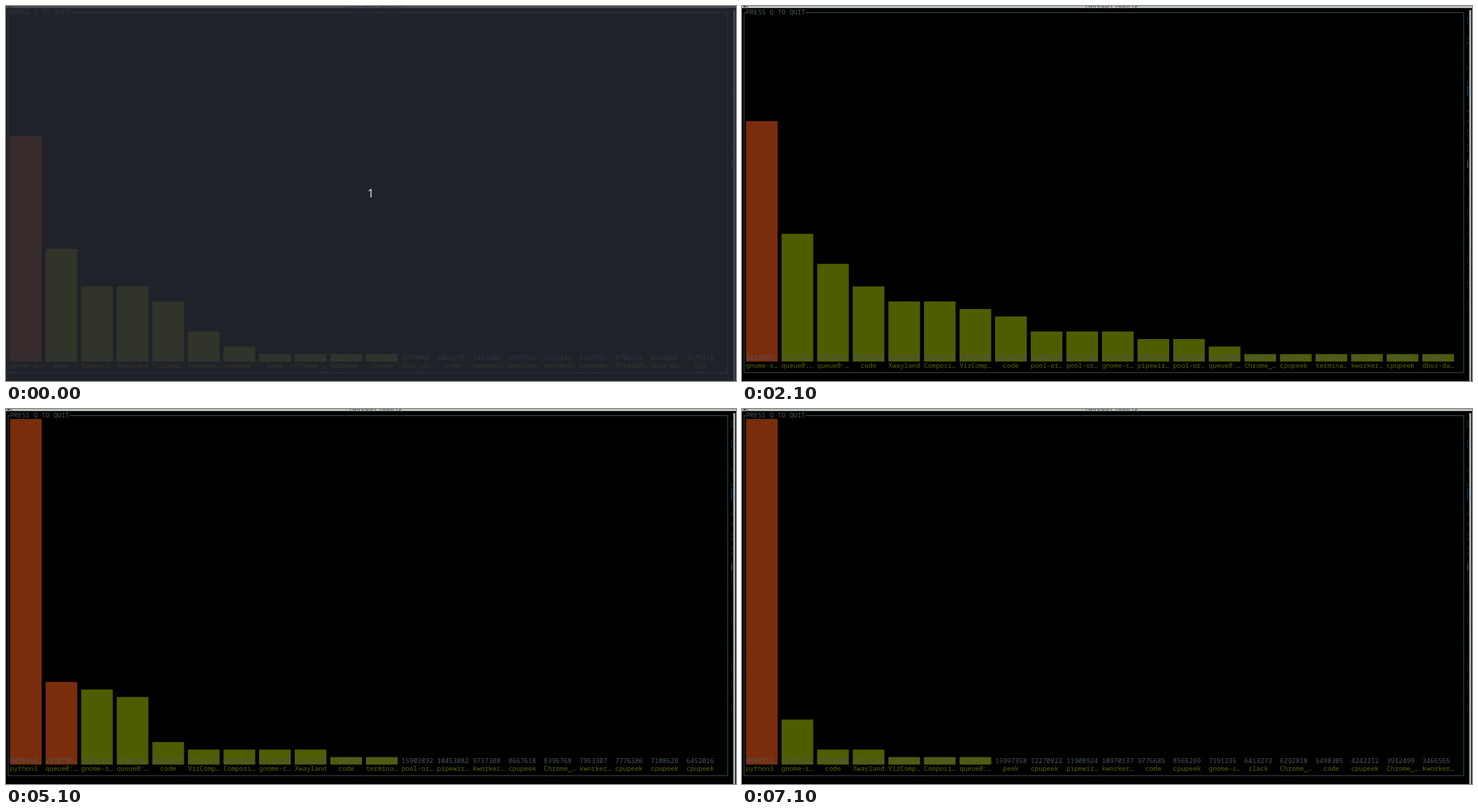
Animation, 1044 px wide and 537 px high, one loop 8000 ms. Source, as an HTML page with a canvas:

```html
<!DOCTYPE html>
<html lang="en">
<head>
<meta charset="utf-8">
<title>CPU bars</title>
<style>
html, body { margin: 0; width: 100%; height: 100%; overflow: hidden; background: #000; }
canvas { display: block; }
</style>
</head>
<body>
<canvas id="stage" width="1044" height="537"></canvas>
<script>
const ctx = document.getElementById('stage').getContext('2d');
const LOOP = 8000;
const COL = 5.657, ROW = 10.76, TOP = 3.9;
const RED = '#7a2d0d', GREEN = '#4f5c00', LABEL = '#596700', GREY = '#4b5b60', LINE = '#3d4c52';
const MONO = '"Noto Sans Mono", "DejaVu Sans Mono", monospace';

// Each entry: process name, then bar height in rows (below 100) or a bare value.
// "*n" repeats the entry.
const samples = [
  { at: 0, top: 226407318, list: `gnome-shell 30, code 15, Compositor 10, Xwayland 10, VizCompositor 8,
    terminator 4, cpupeek 2, peek 1, Chrome_Child 1, cpupeek 1, chrome 1, pool-gnome 6599943, code 6066973,
    kworker/0 5927406, kworker/1 5897549, kworker/2 5523243, cpupeek 5297795, ThreadPool 4708459,
    dbus-daemon 4545006, gjs 3579419` },
  { at: 100, top: 221073814, list: `gnome-shell 29, Compositor 10, Xwayland 10, code 10, VizCompositor 8,
    terminator 5, gjs 3, peek 2, queue0:src 1, Chrome_Child 1, gjs 1, cpupeek 1*2, dbus-daemon 1,
    kworker/0 7117030, Chrome_Child 6977457, kworker/1 6755981, cpupeek 5909325, cpupeek 5675302,
    kworker/2 5425823` },
  { at: 1100, top: 237834605, list: `gnome-shell 32, colord-sane 16, queue0:src 14, Xwayland 8, Compositor 7,
    code 7, colord-sane 6, VizCompositor 6, pool-org 3*3, pipewire-pulse 3, terminator 2, systemd-udevd 2,
    dbus-daemon 2, cpupeek 1, pool-org.x 1, kworker/0 1, colord 1, cpupeek 7330027` },
  { at: 2100, top: 241258730, list: `gnome-shell 32, queue0:src 17, queue0:src 13, code 10, Xwayland 8,
    Compositor 8, VizCompositor 7, code 6, pool-org.x 4*2, gnome-calendar 4, pipewire-pulse 3, pool-org.x 3,
    queue0:src 2, Chrome_Child 1, cpupeek 1, terminator 1, kworker/0 1, cpupeek 1, dbus-daemon 1` },
  { at: 3100, top: 254881147, list: `gnome-shell 34, queue0:src 22, queue0:src 14, code 12, Xwayland 8,
    VizCompositor 8, Compositor 8, code 6, pool-org.x 5*2, gnome-calendar 5, pipewire-pulse 4, pool-org.x 4,
    queue0:src 2, Chrome_Child 2, cpupeek 1, ThreadPool 1, kworker/0 1, Chrome_Child 1, code 1` },
  { at: 4100, top: 258841290, list: `gnome-shell 35, queue0:src 32, queue0:src 26, code 14, Compositor 9,
    VizCompositor 9, Xwayland 8, code 7, pool-org.x 4*2, gnome-calendar 4, pool-org.x 2, code 2, cpupeek 2,
    Chrome_Child 2, kworker/0 1, queue0:src 1, cpupeek 1, code 1, cpupeek 1` },
  { at: 5100, top: 805536642, list: `python3 46, queue0:src 11, gnome-shell 10, queue0:src 9, code 3,
    VizCompositor 2, Compositor 2, gnome-calendar 2, Xwayland 2, code 1, terminator 1, pool-org.x 15903892,
    pipewire-pulse 10453082, kworker/0 9737388, cpupeek 8667618, Chrome_Child 8395768, kworker/1 7953307,
    cpupeek 7776386, cpupeek 7108628, cpupeek 6452016` },
  { at: 6100, top: 958206113, list: `python3 46, gnome-shell 8, queue0:src 5, code 3, Xwayland 2,
    VizCompositor 2, Compositor 2, queue0:src 1, code 1, peek 16120458, cpupeek 12047316,
    pipewire-pulse 10950271, kworker/0 9864120, cpupeek 8710943, Chrome_Child 7530268, terminator 6918804,
    kworker/1 6240517, code 5617320, gjs 4820176, cpupeek 4105983` },
  { at: 7100, top: 958871126, list: `python3 46, gnome-shell 6, code 2, Xwayland 2, VizCompositor 1,
    Compositor 1, queue0:src 1, peek 15997358, cpupeek 12270822, pipewire-pulse 11908924, kworker/0 10970137,
    code 9776685, cpupeek 8565269, gnome-shell 7191235, slack 6413273, Chrome_Child 6292818, code 5498305,
    cpupeek 4242212, Chrome_Child 3912499, kworker/1 3466565` }
];

const fit = s => s.length > 8 ? s.slice(0, 7) + '…' : s;
const noise = n => { const v = Math.sin(n * 91.7) * 43758.5; return v - Math.floor(v); };

function parse({ top, list }, seed) {
  const bars = [];
  for (const item of list.split(',')) {
    const [name, size] = item.trim().split(/\s+/);
    const [num, times = 1] = size.split('*').map(Number);
    for (let k = 0; k < times; k++) {
      // the only bare "pool-org" name is eight letters, so it is lengthened to be cut
      bars.push({ name: fit(name === 'pool-org' ? 'pool-org.x' : name), num });
    }
  }
  const unit = top / (bars[0].num + 0.4);
  bars.forEach((b, i) => {
    b.rows = b.num < 100 ? b.num : 0;
    const part = 0.95 - i * 0.045 + noise(seed * 20 + i) * 0.04;
    b.value = i === 0 ? top : b.rows ? Math.round((b.rows + part) * unit) : b.num;
  });
  return bars;
}
samples.forEach((s, i) => { s.bars = parse(s, i + 1); });

function rect(x, y, w, h, color) {
  ctx.fillStyle = color;
  ctx.fillRect(x, y, w, h);
}

function cells(text, col, row, color, weight = '') {
  ctx.font = `${weight} 9.43px ${MONO}`;
  ctx.textAlign = 'center';
  ctx.textBaseline = 'alphabetic';
  ctx.fillStyle = color;
  [...text].forEach((c, i) => ctx.fillText(c, (col + i + 0.5) * COL, TOP + row * ROW + 8.3));
}

function centred(text, col, row, color) {
  cells(text, col + Math.floor((8 - text.length) / 2), row, color);
}

function drawWindow() {
  rect(0, 0, 1044, 537, '#000');
  rect(0, 0, 1044, 3, '#b8beb8');
  ctx.save();
  ctx.beginPath();
  ctx.rect(0, 0, 1044, 3);
  ctx.clip();
  ctx.font = '10px "Noto Sans", sans-serif';
  ctx.textAlign = 'center';
  ctx.fillStyle = '#303638';
  ctx.fillText('/bin/zsh 183x49', 529, 2);
  rect(2, 0, 4, 2, '#454b4c');
  rect(7, 1, 2, 1, '#454b4c');
  ctx.restore();

  rect(1040, 6, 3, 531, '#a0a9a8');
  for (let y = 16; y < 440; y += 7) {
    const tint = y < 130 ? '#0b1f33' : y < 235 ? '#1c1c20' : '#1c0e06';
    if (noise(y) > 0.45) rect(1037, y, 2, 4, tint);
  }
  rect(1037, 114, 2, 15, '#0d2a48');
  rect(1037, 222, 2, 10, '#34383a');

  ctx.strokeStyle = LINE;
  ctx.lineWidth = 1;
  ctx.beginPath();
  ctx.moveTo(90.5, 9.5);
  ctx.lineTo(1032, 9.5);
  ctx.lineTo(1032, 525);
  ctx.lineTo(3, 525);
  ctx.lineTo(3, 9.5);
  ctx.lineTo(5.7, 9.5);
  ctx.stroke();
  cells('PRESS Q TO QUIT', 1, 0, GREY);
}

function drawBars(bars) {
  const base = 509.2;
  bars.forEach((b, i) => {
    const col = 1 + i * 9;
    if (b.rows) {
      const h = b.rows * ROW;
      rect(col * COL, base - h, 8 * COL, h, b.value > 2e8 ? RED : GREEN);
    }
    centred(fit(String(b.value)), col, 46, GREY);
    centred(b.name, col, 47, LABEL);
  });
}

function drawPointer(x, y) {
  ctx.beginPath();
  [[0, 0], [0, 9], [2.2, 8], [4, 11], [5.6, 10.4], [4.8, 7.4], [6.4, 6.4]]
    .forEach(([dx, dy]) => ctx.lineTo(x + dx, y + dy));
  ctx.closePath();
  ctx.fillStyle = '#202224';
  ctx.fill();
  ctx.strokeStyle = '#c9cdcd';
  ctx.lineWidth = 1;
  ctx.stroke();
}

function pointerAt(t) {
  const tick = Math.floor(t / 100) * 100;
  if (tick === 1100) return [529, 59];
  if (tick >= 5200 && tick <= 6000) {
    const left = (6000 - tick) / 800;
    return [158.5 + 170 * left * left, -5.5 + 300 * left];
  }
  if (tick >= 6600 && tick <= 7000) {
    const p = (tick - 6600) / 400;
    return [165 + 60 * p, -5 + 40 * Math.sin(Math.PI * p)];
  }
  return null;
}

function drawCountdown() {
  rect(0, 0, 1044, 537, 'rgba(40, 43, 52, 0.8)');
  ctx.font = '16px "Noto Sans", sans-serif';
  ctx.textAlign = 'center';
  ctx.fillStyle = '#e6e2d6';
  ctx.fillText('1', 521.5, 274);
}

function draw(t) {
  drawWindow();
  drawBars(samples.findLast(s => s.at <= t).bars);
  const p = pointerAt(t);
  if (p) drawPointer(...p);
  if (t < 100) drawCountdown();
}

const start = performance.now();
function tick() {
  draw((performance.now() - start) % LOOP);
  requestAnimationFrame(tick);
}
tick();
</script>
</body>
</html>
```
